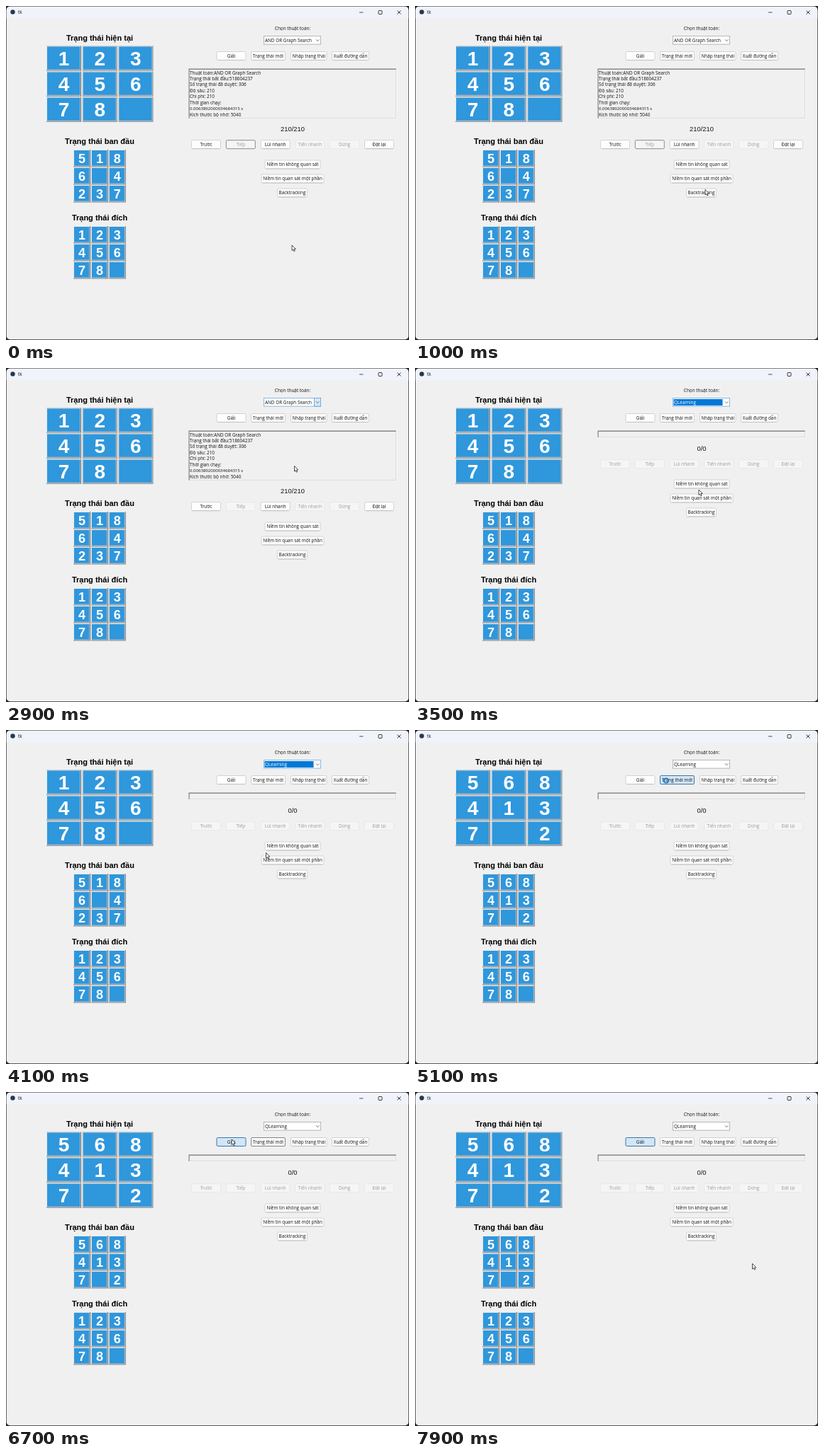
Recreate the animation shown at these times as an HTML page with a canvas. Size 568 by 472 pixels, loop 8000 ms.

```html
<!DOCTYPE html>
<html lang="vi">
<head>
<meta charset="utf-8">
<title>tk</title>
<style>
html, body { margin: 0; width: 100%; height: 100%; overflow: hidden; background: #222; }
canvas { display: block; width: 568px; height: 472px; }
</style>
</head>
<body>
<canvas id="stage"></canvas>
<script>
const W = 568, H = 472, LOOP = 8000, STEP = 100;
const canvas = document.getElementById('stage');
const ctx = canvas.getContext('2d');
const ratio = window.devicePixelRatio || 1;
canvas.width = W * ratio;
canvas.height = H * ratio;

const UI = '"Open Sans", "Noto Sans", sans-serif';
const ARIAL = '"Liberation Sans", Arial, sans-serif';
const BLUE = '#2f97dc', ACCENT = '#0078d7', PAGE = '#f0f0f0';

// Moments at which the window changes
const T = {
  comboHover: 1400, comboFocus: 1600, listOpen: 1800, chosen: 3500,
  newHover: 4800, shuffled: 5000, newLeave: 5300, solveHover: 6700, solveFocus: 6900
};

// Pointer stops: time, x, y
const PATH = [
  [0, 403, 338], [800, 403, 338], [1100, 412, 220], [1500, 425, 48.5], [2400, 425, 48.5],
  [2900, 406.5, 138.5], [3300, 400, 172], [3800, 400, 172], [4100, 366.5, 173.5],
  [4700, 338, 92], [4900, 352, 67], [5200, 352, 67], [5600, 324.5, 260.5],
  [6500, 324.5, 260.5], [6700, 318, 67], [7000, 318, 67], [7700, 475.5, 242.5]
];

const REPORT = [
  'Thuật toán:AND OR Graph Search', 'Trạng thái bắt đầu:518604237',
  'Số trạng thái đã duyệt: 306', 'Độ sâu: 210', 'Chi phí: 210',
  'Thời gian chạy:', '0.0063892000034684315 s', 'Kích thước bộ nhớ: 5040'
];

const STYLES = {
  normal: { fill: '#fdfdfd', line: '#d2d2d2', ink: '#111' },
  disabled: { fill: '#f5f5f5', line: '#e9e9e9', ink: '#9b9b9b' },
  disabledFocus: { fill: '#f5f5f5', line: '#8a8a8a', ink: '#9b9b9b' },
  focus: { fill: '#fbfbfb', line: '#858585', ink: '#111' },
  hot: { fill: '#d3e6f6', line: '#3a78ad', ink: '#111' }
};

function rect(x, y, w, h, fill) {
  ctx.fillStyle = fill;
  ctx.fillRect(x, y, w, h);
}

function text(str, x, y, { size = 6.4, font = UI, weight = 400, ink = '#111', align = 'center' } = {}) {
  ctx.font = `${weight} ${size}px ${font}`;
  ctx.textAlign = align;
  ctx.fillStyle = ink;
  ctx.fillText(str, x, y + size * 0.36);
}

function roundBox(x, y, w, h, r, fill, line) {
  ctx.beginPath();
  ctx.roundRect(x, y, w, h, r);
  ctx.fillStyle = fill;
  ctx.fill();
  if (line) stroke(line);
}

function stroke(color, width = 1) {
  ctx.strokeStyle = color;
  ctx.lineWidth = width;
  ctx.stroke();
}

function polyline(points, color, width) {
  ctx.beginPath();
  points.forEach(([x, y]) => ctx.lineTo(x, y));
  stroke(color, width);
}

function button(label, x, cy, w, style = 'normal') {
  const s = STYLES[style];
  roundBox(x + .5, cy - 6, w - 1, 12, 1.5, s.fill, s.line);
  if (style === 'normal') rect(x + 2, cy + 5.6, w - 4, .8, '#bcbcbc');
  text(label, x + w / 2, cy, { ink: s.ink });
}

function tile(digit, x, y, w, h, size) {
  rect(x, y, w, h, '#707a82');
  rect(x, y, w - 1, h - 1, '#e4eaee');
  rect(x + 1, y + 1, w - 2, h - 2, '#a6b2ba');
  rect(x + 1, y + 1, w - 3, h - 3, BLUE);
  if (digit !== '0') text(digit, x + w / 2, y + h / 2, { size, font: ARIAL, weight: 700, ink: '#fff' });
}

function board(title, titleY, digits, x, y, w, h, dx, dy, size) {
  text(title, 132, titleY, { size: 11, font: ARIAL, weight: 700, ink: '#000' });
  [...digits].forEach((d, i) => tile(d, x + i % 3 * dx, y + Math.floor(i / 3) * dy, w, h, size));
}

function titleBar() {
  rect(0, 0, W, H, '#26282b');
  roundBox(.7, .7, W - 1.4, H - 1.4, 5, PAGE);
  roundBox(.7, .7, W - 1.4, 16.8, [5, 5, 0, 0], '#f0f4fa');
  ctx.beginPath();
  ctx.arc(9.5, 8.5, 3.2, 0, 7);
  ctx.fillStyle = '#27384f';
  ctx.fill();
  text('tk', 17, 9, { align: 'left' });
  polyline([[498, 9], [503.5, 9]], '#222', .8);
  ctx.beginPath();
  ctx.roundRect(525, 6.5, 5, 5, .8);
  stroke('#222', .9);
  polyline([[551.5, 6.5], [556.5, 11.5]], '#222', .9);
  polyline([[556.5, 6.5], [551.5, 11.5]], '#222', .9);
}

function combo(t) {
  const marked = (t >= T.comboFocus && t < T.listOpen) || (t >= T.chosen && t < T.shuffled);
  const hot = t >= T.comboHover && t < T.chosen;
  rect(363, 42, 81, 12.5, hot || marked ? '#6fa9d8' : '#a6a6a6');
  rect(363.8, 42.8, 79.4, 10.9, '#fff');
  if (hot) {
    rect(434, 42, 10, 12.5, '#5b9fd6');
    rect(434.8, 42.8, 8.4, 10.9, '#d5e8f8');
  }
  if (marked) rect(364.5, 44, 69, 9, ACCENT);
  text(t < T.chosen ? 'AND OR Graph Search' : 'QLearning', 365, 48.5,
    { align: 'left', ink: marked ? '#fff' : '#111' });
  polyline([[437, 47.3], [439.2, 49.7], [441.4, 47.3]], '#555', .8);
}

function report(solved) {
  const h = solved ? 71 : 10;
  rect(257.5, 88.5, 293, h, '#fafafa');
  rect(257.5, 88.5, 292.3, h - .7, '#777');
  rect(258.6, 89.8, 291.2, h - 2, PAGE);
  if (solved) REPORT.forEach((line, i) =>
    text(line, 259, 94.2 + i * 8.47, { align: 'left', size: i === 6 ? 6.05 : 6.4 }));
}

function controls(t) {
  const solved = t < T.chosen, lift = solved ? 0 : -60;
  text('Chọn thuật toán:', 404, 31.5);
  combo(t);

  const newStyle = t >= T.newHover && t < T.newLeave ? 'hot'
    : t >= T.newLeave && t < T.solveFocus ? 'focus' : 'normal';
  button('Giải', 296.5, 70.5, 42, t >= T.solveHover ? 'hot' : 'normal');
  button('Trạng thái mới', 345, 70.5, 49, newStyle);
  button('Nhập trạng thái', 401, 70.5, 51.5);
  button('Xuất đường dẫn', 459, 70.5, 53);

  report(solved);
  text(solved ? '210/210' : '0/0', 404, 174 + lift, { size: 9.4, font: ARIAL });

  ['Trước', 'Tiếp', 'Lùi nhanh', 'Tiến nhanh', 'Dừng', 'Đặt lại'].forEach((label, i) => {
    const enabled = solved && [0, 2, 5].includes(i);
    const focused = i === 1 && t < T.comboFocus;
    button(label, 261 + i * 48.8, 195.7 + lift, 42,
      enabled ? 'normal' : focused ? 'disabledFocus' : 'disabled');
  });

  button('Niềm tin không quan sát', 364.5, 224 + lift, 79);
  button('Niềm tin quan sát một phần', 359.5, 244 + lift, 89);
  button('Backtracking', 382, 264 + lift, 43);
}

function pointerAt(t) {
  const i = PATH.findIndex(p => p[0] > t);
  if (i < 0) return PATH[PATH.length - 1].slice(1);
  const [t0, x0, y0] = PATH[i - 1], [t1, x1, y1] = PATH[i];
  const k = (t - t0) / (t1 - t0);
  return [x0 + (x1 - x0) * k, y0 + (y1 - y0) * k];
}

function pointer(t) {
  const [x, y] = pointerAt(t);
  ctx.beginPath();
  if (t >= T.shuffled && t < T.newLeave) {
    ctx.arc(x + 2, y + 4.5, 3.2, 0, 7);
    stroke('#2480c8', 1.7);
    return;
  }
  [[0, 0], [0, 7.6], [1.7, 6.1], [2.9, 8.7], [4.2, 8.1], [3, 5.6], [5.3, 5.4]]
    .forEach(([dx, dy]) => ctx.lineTo(x + dx, y + dy));
  ctx.closePath();
  ctx.fillStyle = '#fff';
  ctx.fill();
  stroke('#222', .8);
}

function draw(t) {
  ctx.setTransform(ratio, 0, 0, ratio, 0, 0);
  const mixed = t >= T.shuffled;
  titleBar();
  board('Trạng thái hiện tại', 45, mixed ? '568413702' : '123456780', 57, 56.5, 49, 35, 50.7, 36.1, 28);
  board('Trạng thái ban đầu', 191, mixed ? '568413702' : '518604237', 95, 203, 24, 24.5, 24.9, 25, 18);
  board('Trạng thái đích', 299.5, '123456780', 95, 311, 24, 24.5, 24.9, 25, 18);
  controls(t);
  pointer(t);
}

const start = performance.now();
function tick() {
  const t = (performance.now() - start) % LOOP;
  draw(Math.floor(t / STEP) * STEP);
  requestAnimationFrame(tick);
}
tick();
</script>
</body>
</html>
```
